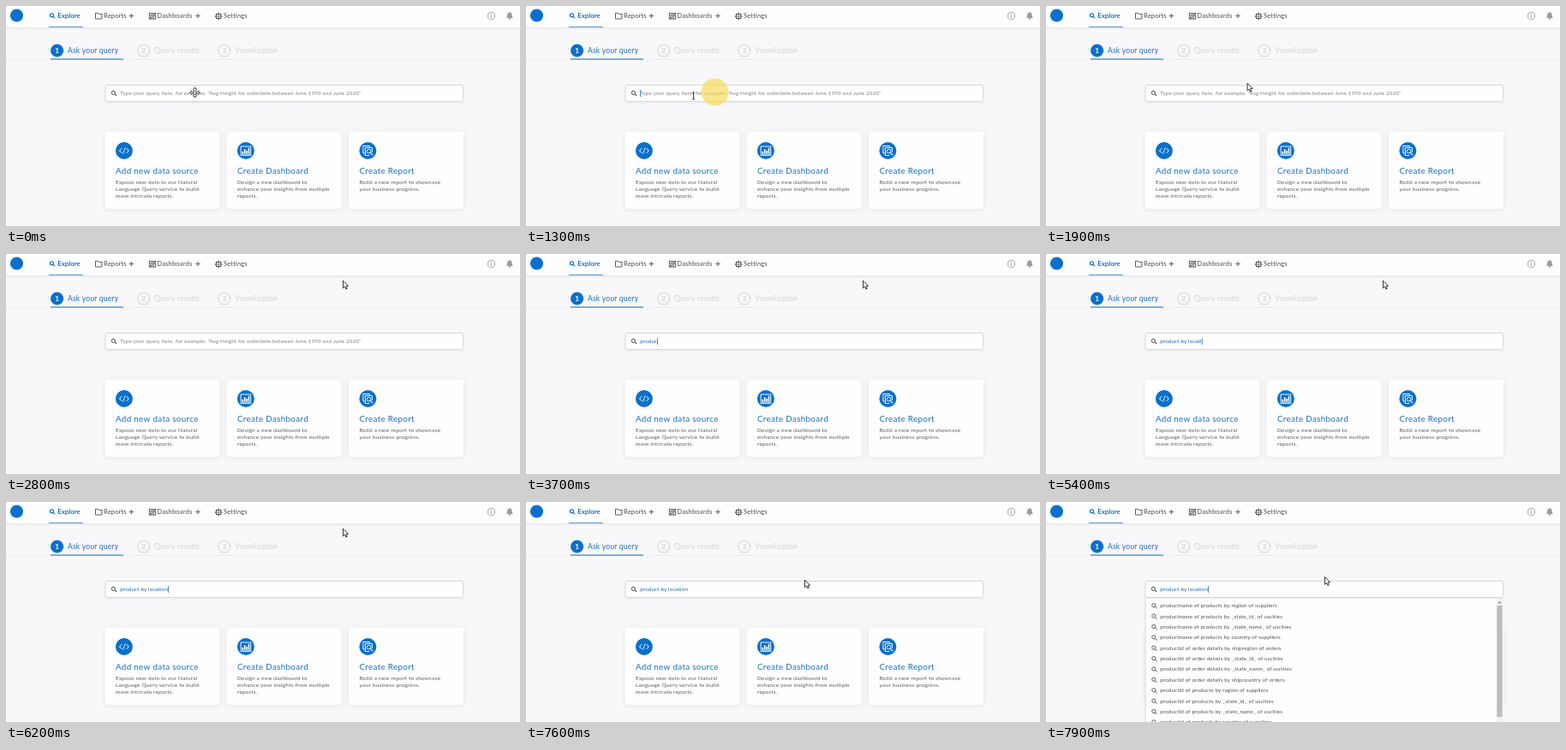
Write an HTML page with a canvas that moves like this. It is 600 px wide and 257 px high and loops after 8000 ms.

```html
<!DOCTYPE html>
<html lang="en">
<head>
<meta charset="utf-8">
<title>Ask your query</title>
<style>
  html, body { margin: 0; width: 100%; height: 100%; overflow: hidden; background: #f8f7f9; }
  canvas { display: block; width: 600px; height: 257px; }
</style>
</head>
<body>
<canvas id="stage"></canvas>
<script>
const W = 600, H = 257, LOOP = 8000;
const BLUE = '#0a70cc', LABEL = '#1c6fba', INK = '#4a4a50', PALE = '#d2d2d6';
const canvas = document.getElementById('stage');
const c = canvas.getContext('2d');
const dpr = window.devicePixelRatio || 1;
canvas.width = W * dpr;
canvas.height = H * dpr;

const QUERY = 'product by location';
const HINT = 'Type your query here, for example: "Avg freight for orderdate between June 1990 and June 2020"';
const TYPE_START = 2850, KEY_TIME = 158, BLINK = 530, OPEN = 7800;
const TYPE_END = TYPE_START + KEY_TIME * (QUERY.length - 1);

const CARDS = [
  { x: 115.5, title: 'Add new data source', icon: codeIcon,
    lines: ['Expose new data to our Natural', 'Language Query service to build', 'more intricate reports.'] },
  { x: 257.5, title: 'Create Dashboard', icon: chartIcon,
    lines: ['Design a new dashboard to', 'enhance your insights from multiple', 'reports.'] },
  { x: 400, title: 'Create Report', icon: reportIcon,
    lines: ['Build a new report to showcase', 'your business progress.'] }
];

const OPTIONS = [
  'productname of products by region of suppliers',
  'productname of products by _state_id_ of uscities',
  'productname of products by _state_name_ of uscities',
  'productname of products by country of suppliers',
  'productid of order details by shipregion of orders',
  'productid of order details by _state_id_ of uscities',
  'productid of order details by _state_name_ of uscities',
  'productid of order details by shipcountry of orders',
  'productid of products by region of suppliers',
  'productid of products by _state_id_ of uscities',
  'productid of products by _state_name_ of uscities',
  'productid of products by country of suppliers'
];

// Pointer path: time, x, y
const PATH = [
  [0, 220.5, 101], [1000, 220.5, 101], [1300, 195.5, 105], [1700, 195.5, 105],
  [2400, 393.5, 31], [6500, 393.5, 31], [7400, 325.5, 91], [7600, 325.5, 91],
  [7800, 325.5, 87.5], [8000, 325.5, 87.5]
];

function text(s, x, y, size, color, gap = 0, weight = 400) {
  c.font = `${weight} ${size}px Lato, "Open Sans", sans-serif`;
  c.letterSpacing = gap + 'px';
  c.fillStyle = color;
  c.fillText(s, x, y);
  return c.measureText(s).width;
}

const small = (s, x, y, color) => text(s, x, y, 6.2, color, 0.176);

function rect(x, y, w, h, color) {
  c.fillStyle = color;
  c.fillRect(x, y, w, h);
}

function disc(x, y, r, color) {
  c.fillStyle = color;
  c.beginPath();
  c.arc(x, y, r, 0, Math.PI * 2);
  c.fill();
}

function ring(x, y, r, color, width) {
  c.strokeStyle = color;
  c.lineWidth = width;
  c.beginPath();
  c.arc(x, y, r, 0, Math.PI * 2);
  c.stroke();
}

function line(points, color, width, close) {
  c.strokeStyle = color;
  c.lineWidth = width;
  c.beginPath();
  points.forEach(([x, y]) => c.lineTo(x, y));
  if (close) c.closePath();
  c.stroke();
}

function panel(x, y, w, h, r, blur, shade) {
  c.save();
  c.shadowColor = shade;
  c.shadowBlur = blur * dpr;
  c.shadowOffsetY = dpr;
  c.fillStyle = '#fefefe';
  c.beginPath();
  c.roundRect(x, y, w, h, r);
  c.fill();
  c.restore();
}

function lens(x, y, color, width = 1) {
  ring(x - 0.6, y - 0.6, 2.1, color, width);
  line([[x + 1, y + 1], [x + 3, y + 3]], color, width + 0.1);
}

function plus(x, y) {
  line([[x - 2.7, y], [x + 2.7, y]], INK, 0.9);
  line([[x, y - 2.7], [x, y + 2.7]], INK, 0.9);
}

function codeIcon(x, y) {
  line([[x - 2.8, y - 2.8], [x - 5.4, y], [x - 2.8, y + 2.8]], '#fff', 1);
  line([[x + 2.8, y - 2.8], [x + 5.4, y], [x + 2.8, y + 2.8]], '#fff', 1);
  line([[x + 1.2, y - 3.6], [x - 1.2, y + 3.6]], '#fff', 0.9);
}

function chartIcon(x, y) {
  c.strokeStyle = '#fff';
  c.lineWidth = 0.9;
  c.strokeRect(x - 5.8, y - 5, 11.6, 9);
  [2.5, 5, 3.5, 6.5].forEach((h, i) => rect(x - 4.4 + i * 2.4, y + 3.4 - h, 1.6, h, '#fff'));
  line([[x - 6.4, y + 5.6], [x + 6.4, y + 5.6]], '#fff', 0.9);
}

function reportIcon(x, y) {
  line([[x - 3, y + 3], [x - 5.5, y + 3], [x - 5.5, y - 5.5], [x + 2, y - 5.5], [x + 2, y - 3.5]], '#fff', 0.9);
  line([[x + 2, y + 5.5], [x - 3, y + 5.5], [x - 3, y - 3.5], [x + 5, y - 3.5], [x + 5, y + 2]], '#fff', 0.9);
  ring(x + 1.2, y + 0.6, 2.3, '#fff', 0.9);
  line([[x + 2.8, y + 2.2], [x + 5.8, y + 5.4]], '#fff', 1.1);
}

function gear(x, y) {
  for (let i = 0; i < 8; i++) {
    const a = i * Math.PI / 4, p = Math.cos(a), q = Math.sin(a);
    line([[x + p * 2.8, y + q * 2.8], [x + p * 4.1, y + q * 4.1]], INK, 1.5);
  }
  ring(x, y, 2.9, INK, 0.9);
  ring(x, y, 1.1, INK, 0.8);
}

function bell(x, y) {
  c.fillStyle = '#9c9ca1';
  c.beginPath();
  c.moveTo(x - 4, y + 2.6);
  c.quadraticCurveTo(x - 2.7, y + 1.5, x - 2.7, y - 0.8);
  c.bezierCurveTo(x - 2.6, y - 5.3, x + 2.6, y - 5.3, x + 2.7, y - 0.8);
  c.quadraticCurveTo(x + 2.7, y + 1.5, x + 4, y + 2.6);
  c.fill();
  disc(x, y + 3.4, 1.1, '#9c9ca1');
}

function header() {
  panel(0, -6, W, 31, 0, 2, 'rgba(60,60,80,.14)');
  disc(12.5, 11, 7.6, BLUE);

  lens(54, 11.4, BLUE, 1.1);
  text('Explore', 60.3, 14.3, 7.8, LABEL, 0, 700);
  rect(50, 24, 40, 1, '#4d9bdc');

  line([[104.5, 8.2], [107.2, 8.2], [108.2, 9.3], [112, 9.3], [112, 15], [104.5, 15]], INK, 0.9, true);
  text('Reports', 114, 14.3, 7.6, INK, 0.12);
  plus(146.3, 11.6);

  c.strokeStyle = INK;
  c.lineWidth = 0.9;
  [[0, 3.5], [4.4, 1.7]].forEach(([dx, h]) => {
    c.strokeRect(167.3 + dx, 8.4, 2.7, h);
    c.strokeRect(167.3 + dx, 10 + h, 2.7, 5.2 - h);
  });
  text('Dashboards', 176.3, 14.3, 7.6, INK, 0.16);
  plus(224, 11.6);

  gear(248.2, 12);
  text('Settings', 254, 14.3, 7.6, INK, 0.12);

  ring(566.6, 11.4, 4.1, '#9a9a9f', 0.9);
  rect(566.1, 9, 1, 1, '#9a9a9f');
  rect(566.1, 10.8, 1, 3, '#9a9a9f');
  bell(588, 11.4);
}

function step(n, x, label, active) {
  if (active) disc(x, 52, 7.6, BLUE);
  else ring(x, 52, 7, PALE, 1);
  c.textAlign = 'center';
  text(n, x, 55, 8.2, active ? '#fff' : PALE, 0, 700);
  c.textAlign = 'left';
  text(label, x + 12.4, 55.2, 8.6, active ? LABEL : PALE, 0.16);
}

function steps() {
  rect(0, 62, W, 1, '#ececef');
  rect(52, 61.5, 85, 1.2, '#2a82d0');
  step('1', 59.6, 'Ask your query', true);
  step('2', 160.6, 'Query results');
  step('3', 254.8, 'Visualization');
}

function card({ x, title, icon, lines }) {
  panel(x, 147, 134, 90, 4, 6, 'rgba(60,60,90,.1)');
  disc(x + 22.4, 169, 10, BLUE);
  icon(x + 22.4, 169);
  text(title, x + 12.5, 195.6, 9.8, LABEL, 0.33);
  lines.forEach((s, i) => text(s, x + 12.5, 207.6 + i * 8.1, 6.5, '#5c5c62', 0.175));
}

function caretOn(t) {
  if (t < 1200) return false;
  let from = 1200;
  if (t >= OPEN) from = OPEN;
  else if (t >= TYPE_END) from = TYPE_END;
  else if (t >= TYPE_START) return true;
  return Math.floor((t - from) / BLINK) % 2 === 0;
}

function search(t) {
  panel(116, 92.5, 417.5, 19, 2, 3, 'rgba(60,60,80,.12)');
  c.strokeStyle = '#d3d3d7';
  c.lineWidth = 0.8;
  c.beginPath();
  c.roundRect(116, 92.5, 417.5, 19, 2);
  c.stroke();
  lens(126, 101.9, INK);
  const count = t < TYPE_START ? 0 : Math.floor((t - TYPE_START) / KEY_TIME) + 1;
  const w = small(QUERY.slice(0, count), 133.2, 104.2, '#1268ae');
  if (!count) small(HINT, 133.2, 104.2, '#808086');
  if (caretOn(t)) rect(133.2 + w, 98, 0.8, 8, '#2570b5');
}

function dropdown() {
  rect(116, 112, 417.5, 146, '#fefefe');
  line([[116, 112], [116, H]], '#cdcdd2', 0.8);
  line([[116, 112], [533.5, 112]], '#d2d2d6', 0.8);
  OPTIONS.forEach((s, i) => {
    const y = 121 + i * 12.38;
    lens(126.4, y + 0.3, INK, 0.9);
    small(s, 133.2, y + 2.2, '#4c4c52');
  });
  rect(526, 112.5, 7.5, 145, '#f0f0f1');
  rect(526.4, 121, 6.2, 130, '#bcbcbe');
  c.fillStyle = '#77777b';
  c.beginPath();
  c.moveTo(527.6, 118.2);
  c.lineTo(529.5, 116);
  c.lineTo(531.4, 118.2);
  c.fill();
}

function pointerAt(t) {
  const i = Math.max(1, PATH.findIndex(p => p[0] > t));
  const [t0, x0, y0] = PATH[i - 1], [t1, x1, y1] = PATH[i];
  const k = (t - t0) / (t1 - t0), e = k * k * (3 - 2 * k);
  return [x0 + (x1 - x0) * e, y0 + (y1 - y0) * e];
}

// Four outlined arrows around the centre
function moveCursor() {
  for (const [color, width] of [['#333', 2.4], ['#fff', 0.9]]) {
    for (let i = 0; i < 4; i++) {
      line([[0, 0], [0, -4.4]], color, width);
      line([[-1.7, -2.9], [0, -4.6], [1.7, -2.9]], color, width);
      c.rotate(Math.PI / 2);
    }
  }
}

function textCursor() {
  line([[0, -4], [0, 4]], '#222', 0.9);
  for (const y of [-4, 4]) line([[-1.6, y], [1.6, y]], '#222', 0.8);
}

function arrowCursor() {
  const shape = [[0, 0], [0, 8.8], [2, 7], [3.4, 10], [4.8, 9.3], [3.5, 6.4], [6, 6.2]];
  c.fillStyle = '#fff';
  c.beginPath();
  shape.forEach(([x, y]) => c.lineTo(x, y));
  c.fill();
  line(shape, '#222', 0.9, true);
}

function pointer(t) {
  const [x, y] = pointerAt(t);
  const inField = x > 116 && y > 93 && y < 111;
  c.save();
  c.translate(x, y);
  if (t < 1000) moveCursor();
  else if (t < 2400 && inField) textCursor();
  else arrowCursor();
  c.restore();
}

function draw(t) {
  c.setTransform(dpr, 0, 0, dpr, 0, 0);
  rect(0, 0, W, H, '#f8f7f9');
  header();
  steps();
  CARDS.forEach(card);
  search(t);
  if (t >= OPEN) dropdown();
  if (t >= 900 && t < 1500) disc(220.5, 100.5, 16, 'rgba(250,218,88,.68)');
  pointer(t);
}

function tick() {
  draw(performance.now() % LOOP);
  requestAnimationFrame(tick);
}
tick();
</script>
</body>
</html>
```
